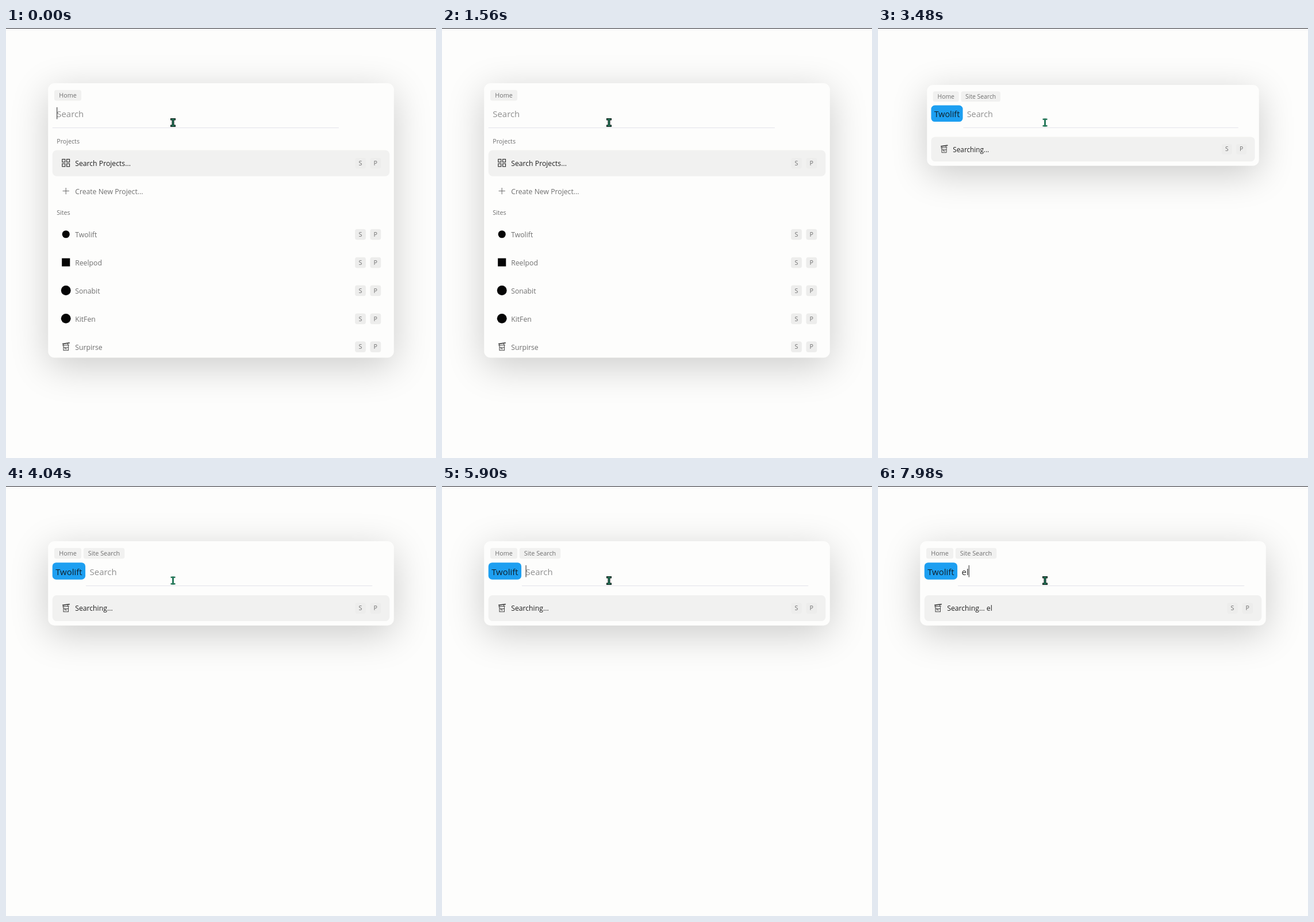
These frames come from a looping animation (748x748 px, 8000 ms). An HTML page with a canvas:

```html
<!DOCTYPE html>
<html lang="en">
<head>
<meta charset="utf-8">
<title>Command menu</title>
<style>
  html, body { margin: 0; width: 100%; height: 100%; overflow: hidden; background: #fdfdfc; }
  canvas { display: block; }
</style>
</head>
<body>
<canvas id="stage" width="748" height="748"></canvas>
<script>
const ctx = document.getElementById('stage').getContext('2d');

const LOOP = 8000;
const ZOOM = 0.94;
const WIDTH = 640, TOP = 96, LIST_Y = 100, LIST_MAX = 400, PAD = 8;
const ROW_H = 48, ROW_GAP = 4, HEAD_H = 24, GROUP_GAP = 8;
const PAPER = '#fdfdfc', INK = '#1f1f1f', GRAY = '#6f6f6f', FAINT = '#8f8f8f';

const T_KEY = 1940, W_KEY = 2060, ENTER = 3370, E_KEY = 7580, L_KEY = 7840;
const BLINK = 530;

const item = (label, icon, keys = true) => ({ label, icon, keys });
const searchProjects = item('Search Projects...', 'grid');
const createProject = item('Create New Project...', 'plus', false);
const bird = item('Twolift', 'dot');
const video = item('Reelpod', 'square');
const music = item('Sonabit', 'disc');
const code = item('KitFen', 'disc');
const surprise = item('Surpirse', 'stand');

const HOME = [
  { title: 'Projects', items: [searchProjects, createProject] },
  { title: 'Sites', items: [bird, video, music, code, surprise] }
];
const FILTERED = [
  { title: 'Sites', items: [bird, video, music, code] },
  { title: 'Projects', items: [searchProjects, createProject] }
];
const MATCH = [{ title: 'Sites', items: [bird] }];

function ease(x) {
  const p = Math.min(1, Math.max(0, x));
  return p * p * (3 - 2 * p);
}

function listHeight(groups) {
  let h = 0;
  groups.forEach((g, i) => {
    if (i) h += GROUP_GAP;
    if (g.title) h += HEAD_H;
    h += g.items.length * (ROW_H + ROW_GAP) - ROW_GAP;
  });
  return Math.min(LIST_MAX, h);
}

function box(x, y, w, h, r, fill) {
  ctx.fillStyle = fill;
  ctx.beginPath();
  ctx.roundRect(x, y, w, h, r);
  ctx.fill();
}

function text(str, x, y, size, color, align = 'left', weight = 400) {
  ctx.font = `${weight} ${size}px "Open Sans", "Noto Sans", sans-serif`;
  ctx.textAlign = align;
  ctx.fillStyle = color;
  ctx.fillText(str, x, y);
}

function circle(r) {
  ctx.beginPath();
  ctx.arc(0, 0, r, 0, Math.PI * 2);
  ctx.fill();
}

function lines(width, ...paths) {
  ctx.lineWidth = width;
  ctx.beginPath();
  for (const [x, y, ...rest] of paths) {
    ctx.moveTo(x, y);
    for (let i = 0; i < rest.length; i += 2) ctx.lineTo(rest[i], rest[i + 1]);
  }
  ctx.stroke();
}

// Each icon is drawn around its own centre.
const icons = {
  grid() {
    ctx.lineWidth = 1.15;
    for (const x of [-6.75, 1.5])
      for (const y of [-6.75, 1.5]) ctx.strokeRect(x, y, 5.25, 5.25);
  },
  plus() { lines(1.15, [0, -6, 0, 6], [-6, 0, 6, 0]); },
  dot() { circle(7); },
  square() { ctx.fillRect(-7.5, -7.5, 15, 15); },
  disc() { circle(9); },
  stand() {
    lines(1.9, [-6.5, -5, 7, -7]);
    lines(1.1, [-6.5, -2.2, 6, -3], [-5, -5, -4, -2], [3, -6, 4, -3]);
    lines(1.1, [-4.5, -2, -4.5, 7, 4.5, 7, 4.5, -2], [-4.5, 1.5, 4.5, 1.5], [-1.5, 1.5, -1.5, 4, 2, 4]);
  }
};

function drawRow(entry, y, selected) {
  const mid = y + ROW_H / 2;
  const color = selected ? INK : GRAY;
  if (selected) box(PAD, y, WIDTH - 2 * PAD, ROW_H, 8, '#f1f1f0');
  ctx.save();
  ctx.translate(33, mid - 0.5);
  ctx.strokeStyle = entry.icon === 'stand' ? '#444' : color;
  ctx.fillStyle = '#050505';
  icons[entry.icon]();
  ctx.restore();
  text(entry.label, 50, mid + 5.2, 13, color);
  if (!entry.keys) return;
  ['S', 'P'].forEach((key, i) => {
    const x = 568 + i * 28;
    box(x, mid - 10, 20, 20, 4, '#ededec');
    text(key, x + 10, mid + 4, 11.4, GRAY, 'center');
  });
}

function drawList(groups, height) {
  ctx.save();
  ctx.beginPath();
  ctx.rect(0, LIST_Y, WIDTH, height);
  ctx.clip();
  let y = LIST_Y;
  groups.forEach((group, g) => {
    if (g) y += GROUP_GAP;
    if (group.title) {
      text(group.title, 16, y + 12, 11.4, GRAY);
      y += HEAD_H;
    }
    group.items.forEach((entry, i) => {
      drawRow(entry, y, g + i === 0);
      y += ROW_H + ROW_GAP;
    });
    y -= ROW_GAP;
  });
  ctx.restore();
}

function drawHeader(state) {
  const chip = (label, x, w) => {
    box(x, 12.5, w, 20, 4, '#f1f1f0');
    text(label, x + w / 2, 27, 11.5, GRAY, 'center', 500);
  };
  chip('Home', 11.5, 50);
  let x = 16, lineX = 8;
  if (state.site) {
    chip('Site Search', 65.5, 76);
    box(8, 39.5, 61, 31.5, 7, '#1d9ff1');
    text(bird.label, 38.5, 62.3, 15.9, '#10202b', 'center');
    x = 77;
    lineX = 70;
  }
  ctx.fillStyle = '#e3e3ea';
  ctx.fillRect(lineX, 82, 530, 1.06);
  text(state.query || 'Search', x, 62.3, 15.9, state.query ? '#2a2a2a' : FAINT);
  if (state.caret) {
    ctx.fillStyle = '#222';
    ctx.fillRect(x + ctx.measureText(state.query).width, 44.5, 1.06, 22);
  }
}

function blink(t, start) {
  return t >= start && Math.floor((t - start) / BLINK) % 2 === 0;
}

function stateAt(t) {
  const site = t >= ENTER;
  let groups = HOME, query = '', from = LIST_MAX, since = 0, caretStart = -180;
  if (site) {
    query = t < E_KEY ? '' : t < L_KEY ? 'e' : 'el';
    const label = 'Searching...' + (query && ' ' + query);
    groups = [{ items: [item(label, 'stand')] }];
    from = listHeight(MATCH);
    since = ENTER;
    caretStart = t < E_KEY ? 3500 : t < L_KEY ? E_KEY : L_KEY;
  } else if (t >= W_KEY) {
    groups = MATCH;
    query = 'tw';
    from = listHeight(FILTERED);
    since = caretStart = W_KEY;
  } else if (t >= T_KEY) {
    groups = FILTERED;
    query = 't';
    since = caretStart = T_KEY;
  }
  const height = from + (listHeight(groups) - from) * ease((t - since) / 100);
  const press = ease((t - ENTER) / 100) - ease((t - ENTER - 120) / 100);
  return { site, groups, query, height, scale: 1 - 0.04 * press, caret: blink(t, caretStart) };
}

function drawPointer(t) {
  const shape = (color, grow) => {
    ctx.fillStyle = color;
    for (const [x, y, w, h] of [[287, 158, 7, 1.5], [289.5, 158, 2, 13], [287, 169.5, 7, 1.5]])
      ctx.fillRect(x - grow, y - grow, w + 2 * grow, h + 2 * grow);
  };
  const soft = t >= 3340 && t < 4180;
  shape(soft ? '#3c7b61' : '#0d1a16', soft ? 0.5 : 1);
  shape('#217a5b', 0);
}

function draw(t) {
  const state = stateAt(t);
  const h = LIST_Y + state.height + PAD;
  const scale = ZOOM * state.scale;

  ctx.setTransform(1, 0, 0, 1, 0, 0);
  ctx.fillStyle = PAPER;
  ctx.fillRect(0, 0, 748, 748);

  ctx.save();
  ctx.translate(374, TOP + h * ZOOM / 2);
  ctx.scale(scale, scale);
  ctx.translate(-WIDTH / 2, -h / 2);
  ctx.save();
  ctx.shadowColor = 'rgba(0, 0, 0, 0.2)';
  ctx.shadowBlur = 70 * scale;
  ctx.shadowOffsetY = 16 * scale;
  box(0, 0, WIDTH, h, 12, PAPER);
  ctx.restore();
  drawHeader(state);
  drawList(state.groups, state.height);
  ctx.restore();

  drawPointer(t);
  ctx.fillStyle = '#26262e';
  ctx.fillRect(0, 0, 748, 1);
}

const start = performance.now();
function tick() {
  draw((performance.now() - start) % LOOP);
  requestAnimationFrame(tick);
}
tick();
</script>
</body>
</html>
```
